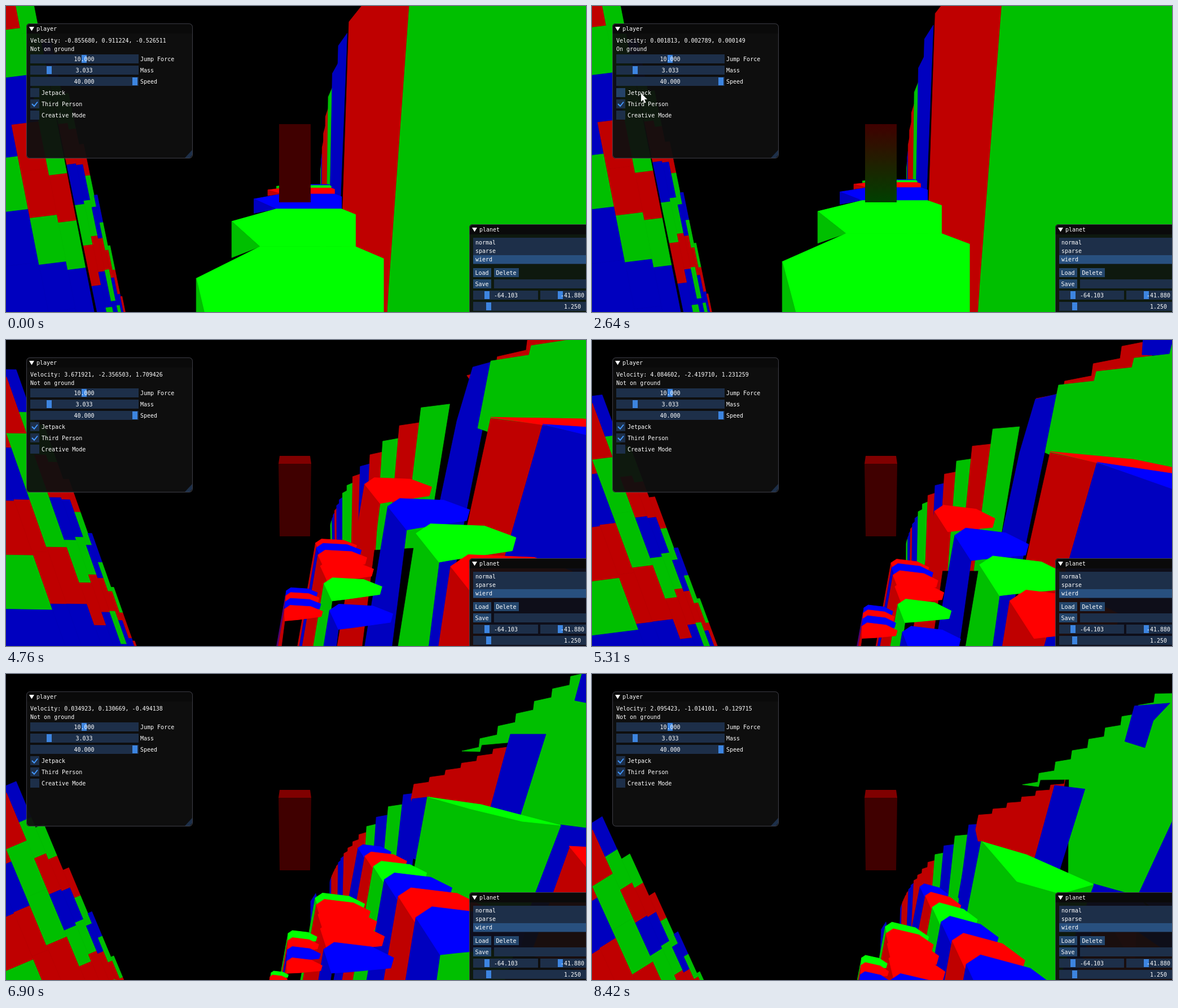
An HTML page with a canvas that plays this animation: 1028 by 544 pixels, repeating every 8.49 s.

```html
<!DOCTYPE html>
<html lang="en">
<head>
<meta charset="utf-8">
<title>Planet</title>
<style>
html, body { margin: 0; width: 100%; height: 100%; overflow: hidden; background: #000; }
canvas { display: block; }
</style>
</head>
<body>
<canvas id="stage" width="1028" height="544"></canvas>
<script>
const ctx = document.getElementById('stage').getContext('2d');
const W = 1028, H = 544, LOOP = 8490, TURN = 4750, SWAP = 5775, DEEP = 900;
const SHADE = { r: '#bf0000', g: '#00bf00', b: '#0000bf' };
const LIT = { r: '#ff0000', g: '#00ff00', b: '#0000ff' };
const { r, g, b } = SHADE;
const FRAME = '#1d2f49', GRAB = '#3d85e0', BUTTON = '#23456b';

// Places scene points on the stage; each group of shapes sets its own.
let map;

function poly(color, ...n) {
  ctx.fillStyle = ctx.strokeStyle = color;
  ctx.lineWidth = 0.8;
  ctx.beginPath();
  for (let i = 0; i < n.length; i += 2) ctx.lineTo(...map(n[i], n[i + 1]));
  ctx.closePath();
  ctx.fill();
  ctx.stroke();
}

function track(keys, t, field = 1) {
  let i = 1;
  while (i < keys.length - 1 && t > keys[i][0]) i++;
  const from = keys[i - 1], to = keys[i];
  const q = Math.min(1, Math.max(0, (t - from[0]) / (to[0] - from[0])));
  return from[field] + (to[field] - from[field]) * q * q * (3 - 2 * q);
}

// One leaning band of the left cliff, cut into cells that cycle through the colours.
function band(x, w, lean, y, len, colours) {
  const at = (dx, yy) => [x + dx + lean * yy, yy];
  for (let i = 0; y < DEEP; i++, y += len) {
    const rise = 0.12 * w;
    poly(SHADE[colours[i % colours.length]],
      ...at(0, y), ...at(w, y - rise), ...at(w, y + len - rise), ...at(0, y + len));
  }
}

// Thin bands at the cliff's edge, each starting lower than the one before.
function fringe(x, w, lean) {
  for (let n = 0; n < 6; n++) {
    band(x, w, lean, 100 + 90 * n, 72 * 0.88 ** n, ['bgr', 'grb', 'rgb'][n % 3]);
    x += w;
    w *= 0.7;
  }
}

// Distant walls whose tops follow a power curve away from x0.
function skyline(x0, y0, a, pow, d, q, colours, base) {
  for (const c of colours) {
    const next = d * q;
    const top = y0 - a * ((d + next) / 2) ** pow;
    const foot = e => x0 + e - (base - top) * e / 1200;
    poly(SHADE[c], x0 + d, top + 2, x0 + next, top - 2, foot(next), base, foot(d), base);
    d = next;
  }
}

// A stepped upper edge from one point to another, closed by the given corners.
function stairs(color, x0, y0, x1, y1, n, ...corners) {
  const dx = (x1 - x0) / n, dy = (y1 - y0) / n, pts = [];
  for (let i = 0; i < n; i++) {
    const x = x0 + i * dx, y = y0 + i * dy;
    pts.push(x, y, x + dx * 0.94, y + dy * 0.3);
  }
  poly(color, ...pts, x1, y1, ...corners);
}

// A pillar: shaded left wall and lit six-sided top.
function pillar(c, x, y, s, turn) {
  const fx = x + 27 * s * turn, fy = y + 42 * s, drop = DEEP - fy;
  poly(SHADE[c], x, y, x + 44 * s, y + 23 * s, fx, fy, fx - 0.14 * drop, DEEP, x - 0.19 * drop, DEEP);
  poly(LIT[c], x, y, x + 18 * s, y - 12 * s, x + 84 * s, y - 4 * s, x + 122 * s, y + 15 * s,
    x + 117 * s, y + 33 * s, x + 44 * s, y + 40 * s, fx, fy);
}

// Pillars coming nearer: both gaps and sizes grow geometrically.
function row(colours, x, y, dx, dy, q, size, grow, turn) {
  for (const c of colours) {
    pillar(c, x, y, size, turn);
    x += dx;
    y += dy;
    dx *= q;
    dy *= q;
    size *= grow;
  }
}

const jump = [[0, -112], [120, -127], [900, -82], [1350, -15], [1830, -127]];
const drift = [[0, -36], [900, -16], [1830, -24], [3600, -24], [4280, 0]];
const height = t => t < 3600 ? track(jump, t) : -127 + 127 * ((t - 3600) / 680) ** 1.6;

// Platforms leading away, number n counted from the far end.
function platform(c, n) {
  const depth = 4.1 * 2.4 ** n;
  const front = k => 493 - 0.53 * 3 ** k, right = k => 570 + 3.1 * 2 ** k;
  const x = 505 - 16 * 1.6 ** n, y = 380 + depth;
  const back = 380 + 0.68 * depth, near = 380 + 1.63 * depth;
  const corner = back + 0.8 * (right(n) - right(n - 1));
  poly(LIT[c], x, y, front(n - 1), back, right(n - 1), back, right(n), corner, right(n), near, front(n), near);
  poly(SHADE[c], x, y, front(n), near, x, y + 0.9 * depth);
}

function canyon(t) {
  const h = height(t), u = track(drift, t);
  map = (x, y) => [x, y + h * 0.3];
  band(-138, 100, 0.196, -63, 94, 'gbbbgbb');
  band(-38, 49, 0.196, -87, 83, 'brgbrrgb');
  band(11, 32, 0.196, -85, 84, 'gggggrgb');
  fringe(43, 17, 0.205);

  const wall = (x, y) => {
    const dy = h * Math.min(1.9, 0.14 * Math.sqrt(Math.max(0, x - 555)));
    const near = Math.min(1, Math.max(0, (x - 620) / 100));
    return [x + u * near - dy * (x - 540) / 2450, y + dy];
  };
  map = wall;
  skyline(555, 385, 45, 0.44, 2.4, 1.45, 'gbrrrgbb', 480);
  poly(r, 669,76, 690,65, 687,105, 668,106);
  poly(b, 692,24, 728,7, 720,100, 687,102);
  poly(r, 605,139, 639,134, 639,104, 742,93, 694,680, 690,900, 590,900, 594,474);
  map = (x, y) => [x, y + h * (Math.max(0, y - 275) / 198) ** 0.88];
  [...'bgrbg'].forEach(platform);
  platform('g', 5);
  map = wall;
  poly(g, 728,-400, 720,97, 742,93, 694,680, 676,900, 1250,900, 1250,-400);
  poly(r, 828,-350, 926,-350, 876,26, 778,38);
  poly(b, 926,-350, 1250,-350, 1250,-16, 876,26);
}

const slide = s => (x, y) => [
  x + s * (62.4 - 0.1475 * x - 0.0422 * y),
  y + s * (-4.9 + 0.1037 * x + 0.0292 * y)
];

function cliff(s) {
  map = (x, y) => [x, y + s * (66 - 0.2 * x)];
  band(-248, 140, 0.37, -112, 92, 'ggbrbrgbr');
  band(-108, 30, 0.37, -111, 88, 'ggbrbrrbg');
  band(-78, 38, 0.37, -75, 96, 'gbrggrbr');
  fringe(-40, 22, 0.37);
}

function ascent(s) {
  const far = slide(s * 0.72), near = slide(s);
  map = far;
  skyline(553, 395, 16, 0.52, 4, 1.3, 'ggbbrbbggrbrgrg', 410);
  stairs(r, 787, 104, 990, -20, 4, 1000, 150, 815, 150);
  poly(b, 982,-80, 1250,-80, 1250,40, 975,26);
  map = near;
  poly(b, 786,105, 829,95, 803,196, 700,700, 650,700, 758,200);
  map = far;
  stairs(g, 827, 80, 1028, 8, 3, 1250, -30, 1250, 300, 895, 240, 803, 200);
  map = near;
  poly(r, 812,200, 895,218, 700,900, 656,900);
  poly(b, 895,218, 1028,262, 1250,330, 1250,900, 700,900);
  poly(LIT.r, 812,198, 960,212, 1250,272, 1028,240, 895,218);
  poly(LIT.b, 895,217, 1028,237, 1250,270, 1250,330, 1028,264);
  row('rbgr', 607, 304, 36, 43, 1.22, 0.88, 1.22, 1);
  map = slide(s * 0.8);
  row('rbrrgb', 530, 396, 1.4, 8.5, 1.55, 0.55, 1.09, 0.6);
  map = far;
  row('brbr', 482, 476, -1, 9, 1.2, 0.42, 1.07, 0);
}

function plateau(s) {
  const far = slide(s * 0.72), near = slide(s), open = Math.max(0, s);
  map = far;
  skyline(571, 388, 9.6, 0.58, 3, 1.25, 'bbbrrrrrbbrrrrgbgb', 400);
  stairs(r, 723, 196, 892, 121, 6, 870, 300, 740, 300, 718, 222);
  map = near;
  poly(b, 720,222, 746,219, 727,330, 704,320);
  map = far;
  stairs(g, 808, 137, 1065, -40, 8, 1300, -60, 1300, 320, 905, 320, 900, 121, 843, 126, 840, 138);
  poly(b, 1025,-16, 1095,-26, 1063,7, 1048,55, 1008,47);
  map = near;
  poly(b, 894,107, 957,107, 912,250, 858,240);
  poly(b, 1145,135, 1300,100, 1300,400, 1075,280);
  poly(b, 983,268, 1075,280, 1250,420, 900,500, 938,388);
  poly(r, 1000,306, 1250,420, 1250,600, 930,500);
  poly(LIT.r, 998,306, 1075,310, 1075,400);
  poly(g, 747,218, 824,236, 983,270, 938,388, 760,900, 640,800);
  poly(LIT.g, 750,219, 842,232, 983,269, 915,262 + 30 * open, 824,240 + 40 * open);
  row('brgbrb', 624, 309, 12, 14.5, 1.27, 0.48, 1.27, 1);
  map = slide(s * 0.8);
  poly(b, 540,404, 549,390, 556,420, 540,458);
  row('grrrb', 548, 398, 2, 12, 1.45, 0.72, 1.09, 0.5);
  map = far;
  row('grbr', 500, 461, -0.6, 13, 1.25, 0.42, 1.07, 0);
  row('gr', 470, 531, -2, 7, 1, 0.25, 1, 0);
}

function box(color, x, y, w, h) {
  ctx.fillStyle = color;
  ctx.fillRect(x, y, w, h);
}

function text(s, x, y, align = 'left') {
  ctx.fillStyle = '#fff';
  ctx.textAlign = align;
  ctx.fillText(s, x, y);
}

function shape(color, ...n) {
  ctx.fillStyle = color;
  ctx.beginPath();
  for (let i = 0; i < n.length; i += 2) ctx.lineTo(n[i], n[i + 1]);
  ctx.fill();
}

function panel(x, y, w, h, title) {
  ctx.save();
  ctx.beginPath();
  ctx.roundRect(x, y, w, h, 6);
  ctx.clip();
  box('rgba(15,15,15,.94)', x, y, w, h);
  box('#0a0a0a', x, y, w, 18);
  ctx.restore();
  ctx.strokeStyle = 'rgba(110,110,128,.5)';
  ctx.lineWidth = 1;
  ctx.beginPath();
  ctx.roundRect(x + 0.5, y + 0.5, w - 1, h - 1, 6);
  ctx.stroke();
  shape('#fff', x + 5, y + 6, x + 14, y + 6, x + 9.5, y + 13.5);
  text(title, x + 18, y + 13);
}

function slider(x, y, w, grab, value, mid) {
  box(FRAME, x, y, w, 16);
  box(GRAB, grab, y + 1, 9, 14);
  text(value, mid, y + 12, 'center');
}

function check(y, label, on, hover) {
  box(hover ? '#254368' : FRAME, 43, y, 16, 16);
  text(label, 63, y + 12);
  if (!on) return;
  ctx.strokeStyle = '#4296fa';
  ctx.lineWidth = 2;
  ctx.beginPath();
  ctx.moveTo(46, y + 8);
  ctx.lineTo(50, y + 12);
  ctx.lineTo(56, y + 4.5);
  ctx.stroke();
}

function button(label, x, y, w) {
  box(BUTTON, x, y, w, 16);
  text(label, x + 3.5, y + 12);
}

const rest = [0.001813, 0.002789, 0.000149];
const velocity = [
  [0, -0.855681, 0.911226, -0.526512],
  [900, -0.504613, 0.377443, -0.317097],
  [1830, ...rest],
  [3600, ...rest],
  [4280, 3.333507, -2.304669, 2.101534],
  [5310, 4.084607, -2.419713, 1.231261],
  [6900, 0.03492, 0.13067, -0.494138],
  [8420, 2.095423, -1.014101, -0.129715]
];

function playerPanel(t, grounded) {
  panel(36, 31, 295, 240, 'player');
  const v = [1, 2, 3].map(axis => track(velocity, t, axis).toFixed(6));
  text('Velocity: ' + v.join(', '), 43, 65);
  text(grounded ? 'On ground' : 'Not on ground', 43, 80);
  [['Jump Force', 134, '10.000'], ['Mass', 72, '3.033'], ['Speed', 224, '40.000']].forEach(([name, grab, value], i) => {
    slider(43, 86 + i * 20, 192, grab, value, 138.5);
    text(name, 238, 98 + i * 20);
  });
  check(146, 'Jetpack', t > 2850, t > 2500 && t < 3200);
  check(166, 'Third Person', true);
  check(186, 'Creative Mode', false);
  shape(FRAME, 330, 256, 330, 265, 326, 270, 317, 270);
}

function planetPanel() {
  panel(821, 388, 230, 180, 'planet');
  box(FRAME, 828, 412, 200, 47);
  box('#28507f', 828, 443, 200, 15);
  ['normal', 'sparse', 'wierd'].forEach((s, i) => text(s, 832, 424 + i * 15));
  button('Load', 828, 466, 32);
  button('Delete', 865, 466, 44);
  button('Save', 828, 486, 32);
  box(FRAME, 865, 486, 163, 16);
  slider(828, 506, 115, 848, '-64.103', 886);
  slider(947, 506, 115, 978, '-41.880', 1004);
  slider(828, 526, 230, 851, '1.250', 1004);
}

function avatar(t, grounded) {
  if (t > TURN) {
    shape('#400000', 483, 219, 541, 219, 539, 349, 485, 349);
    shape('#800000', 485, 206, 539, 206, 541, 220, 483, 220);
    return;
  }
  const shade = ctx.createLinearGradient(0, 210, 0, 349);
  shade.addColorStop(0, '#400000');
  shade.addColorStop(1, grounded ? '#004000' : '#400000');
  box(shade, 484, 210, 56, 139);
}

function cursor(t) {
  if (t < 2100 || t > 3300) return;
  ctx.save();
  ctx.translate(track([[2100, 512], [2550, 87]], t), track([[2100, 272], [2550, 155]], t));
  shape('#fff', 0, 0, 0, 15, 3.5, 12, 6, 17.5, 8.5, 16.5, 6, 11, 11, 11);
  ctx.restore();
}

// How far the turned view has travelled.
function travel(t) {
  if (t < 5310) return (t - 5310) * 0.0013;
  if (t < 6900) return 1.5 * (1 - (1 - (t - 5310) / 1590) ** 2);
  return 1.5 + ((t - 6900) / 1520) ** 1.5;
}

function draw(t) {
  const grounded = t > 1830 && t < 3650;
  box('#000', 0, 0, W, H);
  if (t < TURN) canyon(t);
  else {
    const s = travel(t);
    cliff(s);
    if (t < SWAP) ascent(s);
    else plateau(s - 1.5);
  }
  avatar(t, grounded);
  ctx.font = '10px "DejaVu Sans Mono", monospace';
  playerPanel(t, grounded);
  planetPanel();
  cursor(t);
}

const start = performance.now();
function tick() {
  draw((performance.now() - start) % LOOP);
  requestAnimationFrame(tick);
}
tick();
</script>
</body>
</html>
```
